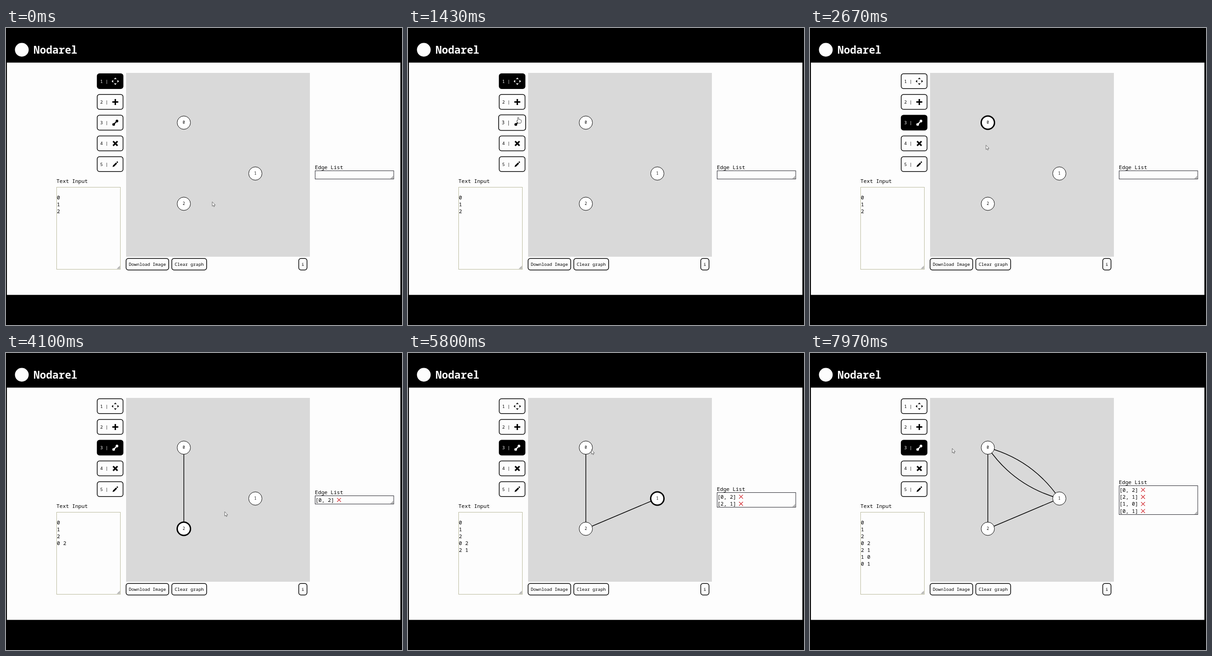
Animation, 864 px wide and 648 px high, one loop 8000 ms. Source, as an HTML page:

```html
<!DOCTYPE html>
<html lang="en">
<head>
<meta charset="utf-8">
<title>Graph editor</title>
<style>
  html, body { margin: 0; width: 100%; height: 100%; overflow: hidden; background: #000; }
  svg { display: block; width: 100vw; height: 100vh; }
  text { font-family: "Roboto Mono", "Noto Sans Mono", "DejaVu Sans Mono", monospace; font-size: 11.4px; white-space: pre; }
  .small { font-size: 9.65px; }
  .mid { text-anchor: middle; }
</style>
</head>
<body>
<svg id="stage" viewBox="0 0 864 648"></svg>
<script>
const LOOP = 8000;
const stage = document.getElementById('stage');

function add(parent, tag, attrs = {}, text) {
  const el = document.createElementNS('http://www.w3.org/2000/svg', tag);
  set(el, attrs);
  if (text !== undefined) el.textContent = text;
  parent.appendChild(el);
  return el;
}
function set(el, attrs) {
  for (const key in attrs) el.setAttribute(key, attrs[key]);
}
const show = (el, on) => set(el, { visibility: on ? 'visible' : 'hidden' });
const rect = (parent, x, y, width, height, attrs) =>
  add(parent, 'rect', { x, y, width, height, ...attrs });
const label = (parent, x, y, text, attrs) =>
  add(parent, 'text', { x, y, ...attrs }, text);
const grip = (parent, x, y) =>
  add(parent, 'path', { d: `M${x} ${y - 7}V${y}H${x - 7}Z`, fill: '#b5b5b5' });

// Page
rect(stage, 0, 0, 864, 648, { fill: '#000' });
rect(stage, 2, 75.5, 858.5, 506.8, { fill: '#fdfdfd' });
add(stage, 'circle', { cx: 34.5, cy: 47.5, r: 15, fill: '#fdfdfd' });
label(stage, 60, 56, 'Nodarel', { fill: '#fdfdfd', 'font-weight': 700, style: 'font-size:22.8px' });
rect(stage, 262, 98, 401, 401, { fill: '#d9d9d9' });

// Tool buttons; icons are drawn around their own centre
const icons = [
  '<path fill="currentColor" d="M0-8l3 3.4h-6zM0 8l3-3.4h-6zM-8 0l3.4-3v6zM8 0l-3.4-3v6z"/>',
  '<path stroke="currentColor" stroke-width="3.2" d="M-6.5 0H6.5M0-6.5V6.5"/>',
  '<path stroke="currentColor" stroke-width="2.4" d="M-3.6 3.7L3.6-3.7"/><g fill="currentColor"><circle cx="-3.6" cy="3.7" r="2.9"/><circle cx="3.6" cy="-3.7" r="2.9"/></g>',
  '<path stroke="currentColor" stroke-width="3.4" d="M-4.8-4.8L4.8 4.8M4.8-4.8L-4.8 4.8"/>',
  '<path fill="currentColor" d="M-6 6l1-3.5 6.5-6.3 2.4 2.4L-2.5 5zM2.4-4.7l1.4-1.2q.8-.5 1.6.3t.4 1.6L4.7-2.4z"/>'
];
const tools = icons.map((icon, i) => {
  const y = 116 + 45.25 * i;
  const g = add(stage, 'g');
  const box = rect(g, -28.2, -16.3, 56.4, 32.6, { rx: 5, stroke: '#000', 'stroke-width': 1.5 });
  label(g, -21.7, 3.5, `${i + 1} |`, { class: 'small', fill: 'currentColor' });
  add(g, 'g', { transform: 'translate(11.3 .2)' }).innerHTML = icon;
  return { g, box, y };
});

function bottomButton(x, width, text) {
  rect(stage, x, 502.8, width, 25.2, { rx: 5, fill: '#fdfdfd', stroke: '#000', 'stroke-width': 1.5 });
  label(stage, x + width / 2, 518.9, text, { class: 'small mid' });
}
bottomButton(262, 93, 'Download Image');
bottomButton(361.7, 76, 'Clear graph');
bottomButton(638.7, 18, 'i');

// Text input
label(stage, 110, 337.7, 'Text Input');
rect(stage, 110.5, 347.5, 139, 179, { fill: '#fdfdfd', stroke: '#b9b99c' });
grip(stage, 248.5, 525.5);
['0', '1', '2'].forEach((line, i) => label(stage, 111, 374 + 15 * i, line));

// Graph
const nodes = [[388, 206.5], [544, 317.5], [388, 383.5]];
const edges = [
  { from: 0, to: 2, at: 3130 },
  { from: 2, to: 1, at: 4600 },
  { from: 1, to: 0, at: 5950 },
  { from: 0, to: 1, at: 6880 }
];
function edgePath({ from, to }, bend) {
  const [x1, y1] = nodes[from], [x2, y2] = nodes[to];
  const dx = x2 - x1, dy = y2 - y1, k = bend / Math.hypot(dx, dy);
  return `M${x1} ${y1}Q${(x1 + x2) / 2 + dy * k} ${(y1 + y2) / 2 - dx * k} ${x2} ${y2}`;
}
edges.forEach((edge, i) => {
  edge.line = add(stage, 'path', { fill: 'none', stroke: '#000', 'stroke-width': 1.5 });
  edge.typed = label(stage, 111, 419 + 15 * i, `${edge.from} ${edge.to}`);
});
const discs = nodes.map(([cx, cy], i) => {
  const disc = add(stage, 'circle', { cx, cy, fill: '#fff', stroke: '#000' });
  label(stage, cx, cy + 2.9, i, { class: 'mid', style: 'font-size:8.2px' });
  return disc;
});

// Edge list grows around its centre line
const LIST_MIDDLE = 320.7, ROW = 15.4;
const list = add(stage, 'g');
label(list, 674, -3, 'Edge List');
const listBox = rect(list, 674.5, 0.5, 171.5, 18, { fill: '#fdfdfd', stroke: '#23232b' });
const listGrip = grip(list, 845.3, 0);
edges.forEach((edge, i) => {
  const y = 9.6 + ROW * i;
  edge.row = add(list, 'g');
  label(edge.row, 675, y + 4, `[${edge.from}, ${edge.to}]`);
  add(edge.row, 'path', { d: `M722.4 ${y - 4.2}l8.4 8.4m0-8.4l-8.4 8.4`, stroke: '#d32f35', 'stroke-width': 1.3 });
});

// Pointer
const arrow = add(stage, 'path', {
  d: 'M0 .3V9.8L2.1 7.9 3.5 11 5.1 10.3 3.8 7.3H6.7Z',
  fill: '#fff', stroke: '#444', 'stroke-width': 0.8
});
const hand = add(stage, 'path', {
  d: 'M-1.2 1Q0-.8 1.2 1V5Q2.5 4.2 3.3 5.3 4.8 4.8 5.3 6 6.8 5.8 6.8 7.4V10Q6.6 12 5.4 13.2H-.4L-3.5 8.6Q-3.5 6.8-1.2 8.2Z',
  fill: '#fff', stroke: '#333', 'stroke-width': 0.9, 'stroke-linejoin': 'round'
});

// Pointer stops: time, x, y
const route = [
  [0, 450, 379], [350, 450, 379], [1280, 240.4, 194.5], [1780, 240.4, 194.5],
  [2280, 384, 206], [2430, 384, 206], [2670, 384, 255], [3000, 384, 379],
  [3350, 384, 379], [4100, 477, 346], [4480, 538, 316], [4800, 538, 316],
  [5800, 400.3, 211], [5880, 394, 207], [6080, 394, 207], [6770, 528, 312],
  [6820, 531, 314], [7180, 531, 314], [7850, 310.3, 208], [8000, 310.3, 208]
];
function slope(i, c) {
  const a = route[i - 1], b = route[i], d = route[i + 1];
  if (!a || !d) return 0;
  const before = b[c] - a[c], after = d[c] - b[c];
  return before * after <= 0 ? 0 : (before + after) / (d[0] - a[0]);
}
function pointer(t) {
  const i = Math.max(0, route.findIndex(p => p[0] > t) - 1);
  const a = route[i], b = route[i + 1], span = b[0] - a[0];
  const u = (t - a[0]) / span, v = 1 - u;
  return [1, 2].map(c =>
    a[c] * v * v * (1 + 2 * u) + b[c] * u * u * (3 - 2 * u) +
    span * u * v * (slope(i, c) * v - slope(i + 1, c) * u));
}

// Selected node after each click; -1 clears
const picks = [[0, -1], [2370, 0], [3130, 2], [4600, 1], [5950, 0], [6880, 1], [7130, -1]];

function draw(t) {
  const [x, y] = pointer(t);
  const active = t < 1720 ? 0 : 2;
  let hovering = false;
  tools.forEach(({ g, box, y: cy }, i) => {
    const over = Math.abs(x - 227.2) < 28.5 && Math.abs(y - cy) < 16.8;
    hovering ||= over;
    set(g, {
      transform: `translate(227.2 ${cy}) scale(${over ? 1.045 : 1})`,
      color: i === active ? '#fff' : '#000'
    });
    set(box, { fill: i === active ? '#000' : '#fdfdfd' });
  });

  const picked = picks.filter(p => p[0] <= t).pop()[1];
  discs.forEach((disc, i) => set(disc, {
    r: 14.5, 'stroke-width': i === picked ? 3 : 1
  }));

  const made = edges.filter(e => e.at <= t);
  for (const edge of edges) {
    const on = made.includes(edge);
    const twin = made.some(e => e.from === edge.to && e.to === edge.from);
    set(edge.line, { d: edgePath(edge, twin ? 35 : 0) });
    [edge.line, edge.typed, edge.row].forEach(el => show(el, on));
  }
  const height = Math.round(Math.max(19, ROW * made.length + 2));
  set(list, { transform: `translate(0 ${Math.round(LIST_MIDDLE - height / 2)})` });
  set(listBox, { height: height - 1 });
  set(listGrip, { transform: `translate(0 ${height - 1.2})` });

  show(arrow, !hovering);
  show(hand, hovering);
  [arrow, hand].forEach(el => set(el, { transform: `translate(${x} ${y})` }));
}

const start = performance.now();
function tick(now) {
  draw(Math.max(0, now - start) % LOOP);
  requestAnimationFrame(tick);
}
draw(0);
requestAnimationFrame(tick);
</script>
</body>
</html>
```
